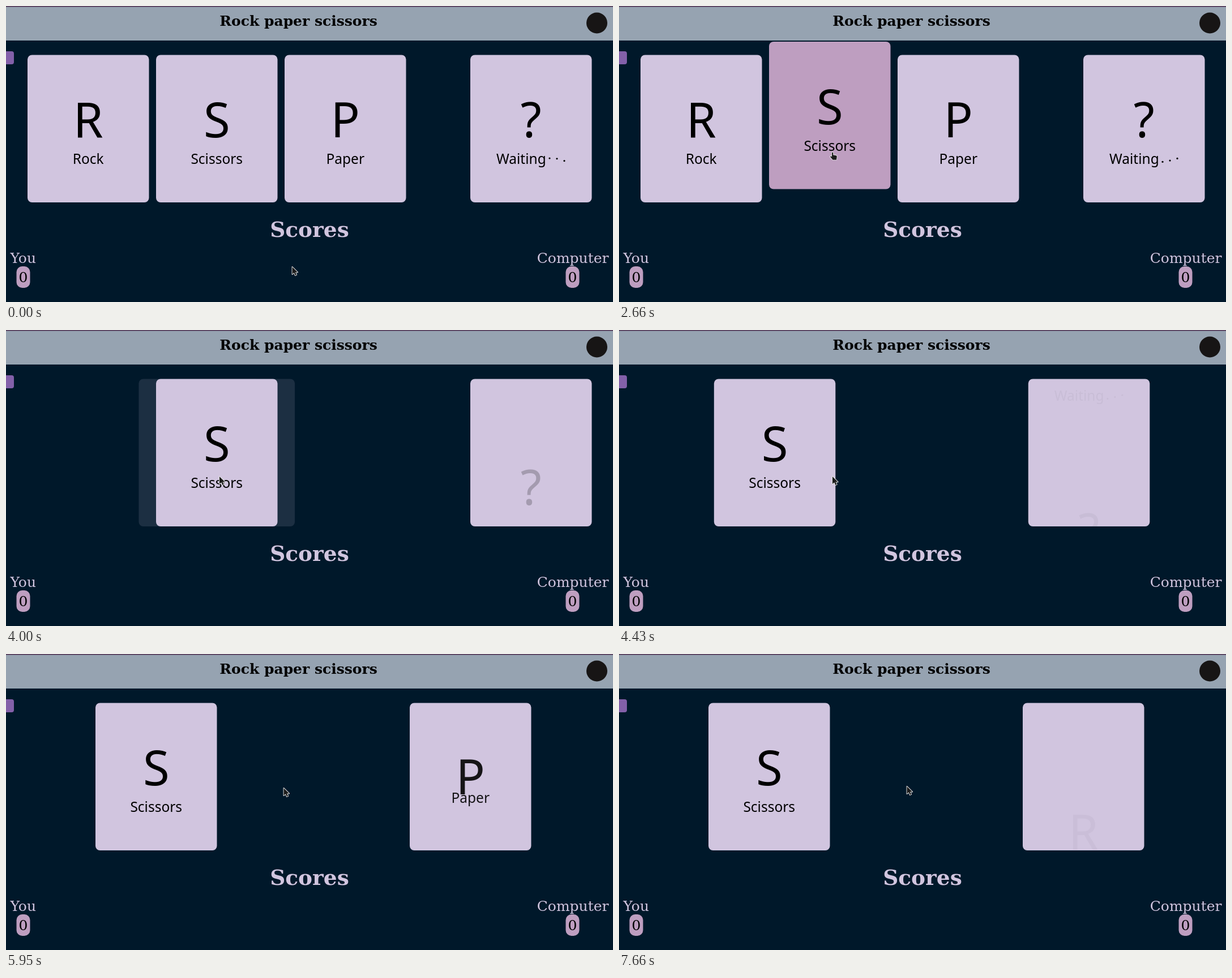
Recreate the animation shown at these times as an HTML page with a canvas. Size 1072 px wide and 523 px high, loop 8 s.

```html
<!DOCTYPE html>
<html lang="en">
<head>
<meta charset="utf-8">
<title>Rock paper scissors</title>
<style>
  html, body { margin: 0; width: 100%; height: 100%; overflow: hidden; background: #00182a; }
  canvas { display: block; width: 1072px; height: 523px; }
</style>
</head>
<body>
<canvas id="stage" width="1072" height="523"></canvas>
<script>
const ctx = document.getElementById('stage').getContext('2d');
const LOOP = 8000;
const BG = [0, 24, 42], LILAC = [209, 197, 223], MAUVE = [190, 158, 192], BLACK = [0, 0, 0];
const SANS = '"Noto Sans", "Open Sans", sans-serif';
const SERIF = '"DejaVu Serif", serif';
const CARD = { y: 86.5, w: 214.5, h: 260.5 };
const NAMES = { R: 'Rock', S: 'Scissors', P: 'Paper', '?': 'Waiting' };

// Times of the main events
const HOVER = 1380, CLICK = 2890, GATHER = 3500, SLIDE = 4240;

// Rounds shown on the computer's card: start, symbol coming in, symbol going out
const ROUNDS = [[4420, '?', 'R'], [5620, 'P', 'P'], [6920, 'S', 'R']];
const ENTER = 420, LEAVE = 330;

// Pointer path: time, x, y
const PATH = [
  [0, 505.5, 461], [100, 505.5, 461], [820, 399, 436], [1100, 396, 400],
  [1380, 390, 343], [1600, 382, 258], [1900, 382, 258], [2600, 377, 258],
  [2890, 377, 259], [5650, 377, 259], [5940, 490.5, 237],
  [6780, 490.5, 237], [6860, 508.5, 234]
];

const clamp = v => Math.min(1, Math.max(0, v));
const span = (t, start, length) => clamp((t - start) / length);
const mix = (a, b, k) => a + (b - a) * k;
const rgb = c => `rgb(${c.map(Math.round).join(',')})`;
const blend = (a, b, k) => rgb(a.map((v, i) => mix(v, b[i], k)));
const cubicInOut = x => x < 0.5 ? 4 * x ** 3 : 1 - 4 * (1 - x) ** 3;

// CSS "ease", cubic-bezier(.25, .1, .25, 1)
function ease(x) {
  if (x <= 0 || x >= 1) return clamp(x);
  const curve = (s, a, b) => 3 * s * (1 - s) ** 2 * a + 3 * s * s * (1 - s) * b + s ** 3;
  let lo = 0, hi = 1;
  for (let i = 0; i < 24; i++) {
    const mid = (lo + hi) / 2;
    if (curve(mid, 0.25, 0.25) < x) lo = mid; else hi = mid;
  }
  return curve(lo, 0.1, 1);
}

function box(x, y, w, h, r, color) {
  ctx.fillStyle = color;
  ctx.beginPath();
  ctx.roundRect(x, y, w, h, r);
  ctx.fill();
}

function disc(x, y, r, color) {
  ctx.fillStyle = color;
  ctx.beginPath();
  ctx.arc(x, y, r, 0, Math.PI * 2);
  ctx.fill();
}

function text(str, x, y, font, color, align = 'center') {
  ctx.font = font;
  ctx.fillStyle = color;
  ctx.textAlign = align;
  ctx.fillText(str, x, y);
}

function face(sym, x, iconY, labelY, color, t) {
  const mid = x + CARD.w / 2;
  text(sym, mid, 232 + iconY, `85px ${SANS}`, color);
  const font = `24.5px ${SANS}`;
  if (sym !== '?') {
    text(NAMES[sym], mid, 279 + labelY, font, color);
    return;
  }
  text(NAMES[sym], x + 46, 279 + labelY, font, color, 'left');
  for (let i = 0; i < 3; i++) {
    const swing = Math.cos(2 * Math.PI * (t / 1855 + 0.07 - 0.2 * i));
    disc(x + 140 + 13 * i, 272 - 3.3 * swing + labelY, 1.6, color);
  }
}

function playerCard(sym, x, dy, fill, alpha) {
  box(x, CARD.y + dy, CARD.w, CARD.h, 8, blend(BG, fill, alpha));
  face(sym, x, dy, dy, blend(BG, BLACK, alpha));
}

function playerCards(t) {
  const gather = cubicInOut(span(t, GATHER, SLIDE - GATHER));
  if (gather < 1) {
    playerCard('R', 38 + 227 * gather, 0, LILAC, 1 - gather);
    playerCard('P', 492 - 227 * gather, 0, LILAC, 1 - gather);
  }
  const hovered = t >= HOVER && t < CLICK;
  const lift = ease(span(t, HOVER, 1000)) - ease(span(t, CLICK, 1000));
  const x = 265 - 107 * ease(span(t, SLIDE, 300));
  playerCard('S', x, -23.5 * lift, hovered ? MAUVE : LILAC, 1);
}

function leaving(sym, x, u, t) {
  const drop = 120 * u ** 1.85;
  ctx.globalAlpha = 1 - u;
  face(sym, x, drop, 3 * drop, '#000', t);
}

function computerCard(t) {
  const x = 820 - 107 * ease(span(t, SLIDE, 300));
  box(x, CARD.y, CARD.w, CARD.h, 8, rgb(LILAC));
  ctx.save();
  ctx.beginPath();
  ctx.roundRect(x, CARD.y, CARD.w, CARD.h, 8);
  ctx.clip();
  const round = ROUNDS.filter(r => t >= r[0]).pop();
  if (!round) {
    leaving('?', x, span(t, 3450, 700), t);
  } else {
    const [start, inSym, outSym] = round;
    if (t < start + ENTER) {
      const v = (1 - span(t, start, ENTER)) ** 1.5;
      ctx.globalAlpha = 1 - v;
      face(inSym, x, 160 * v, -160 * v, '#000', t);
    } else {
      // The last symbol lingers as a faint trace
      const u = span(Math.min(t, 7660), start + ENTER, LEAVE);
      leaving(outSym, x, u, t);
    }
  }
  ctx.restore();
}

function score(name, nameX, align, mid) {
  text(name, nameX, 454, `25px ${SERIF}`, rgb(LILAC), align);
  box(mid - 12, 460, 24, 38, 10, rgb(MAUVE));
  text('0', mid, 488, `25px ${SERIF}`, '#000');
}

function page() {
  ctx.fillStyle = rgb(BG);
  ctx.fillRect(0, 0, 1072, 523);
  ctx.fillStyle = '#96a3b1';
  ctx.fillRect(0, 0, 1072, 61);
  ctx.fillStyle = '#4a2c4c';
  ctx.fillRect(0, 0, 1072, 1.5);
  text('Rock paper scissors', 516.5, 35, `bold 25px ${SERIF}`, '#000');
  disc(1043.5, 30, 18.5, '#171515');
  box(-10, 80, 24, 23, 4, '#8360a9');
  text('Scores', 536, 408, `bold 37.5px ${SERIF}`, rgb(LILAC));
  score('You', 7.5, 'left', 30.5);
  score('Computer', 1064.5, 'right', 1000.5);
}

const ARROW = new Path2D('M0 0V13L3.2 10.3L5.4 15L7.6 14L5.5 9.5H9.6Z');
const HAND = new Path2D('M-1 1Q0 -.6 1.2 1V5L6.5 6Q8 6.4 7.8 8L7 13.5H.6L-3.8 8.6Q-4.2 7 -2.6 7L-1 8.2Z');

function pointer(t) {
  const i = PATH.findIndex(p => p[0] > t);
  let [, x, y] = PATH[PATH.length - 1];
  if (i > 0) {
    const a = PATH[i - 1], b = PATH[i];
    const k = span(t, a[0], b[0] - a[0]);
    x = mix(a[1], b[1], k);
    y = mix(a[2], b[2], k);
  }
  const shape = t >= HOVER && t < CLICK ? HAND : ARROW;
  ctx.save();
  ctx.translate(x, y);
  ctx.lineJoin = 'round';
  ctx.lineWidth = 1.8;
  ctx.strokeStyle = '#e8e8e8';
  ctx.stroke(shape);
  ctx.fillStyle = '#1c1c1c';
  ctx.fill(shape);
  ctx.restore();
}

function draw(now) {
  const t = now % LOOP;
  page();
  playerCards(t);
  computerCard(t);
  pointer(t);
}

const began = performance.now();
function tick() {
  draw(performance.now() - began);
  requestAnimationFrame(tick);
}
tick();
</script>
</body>
</html>
```
